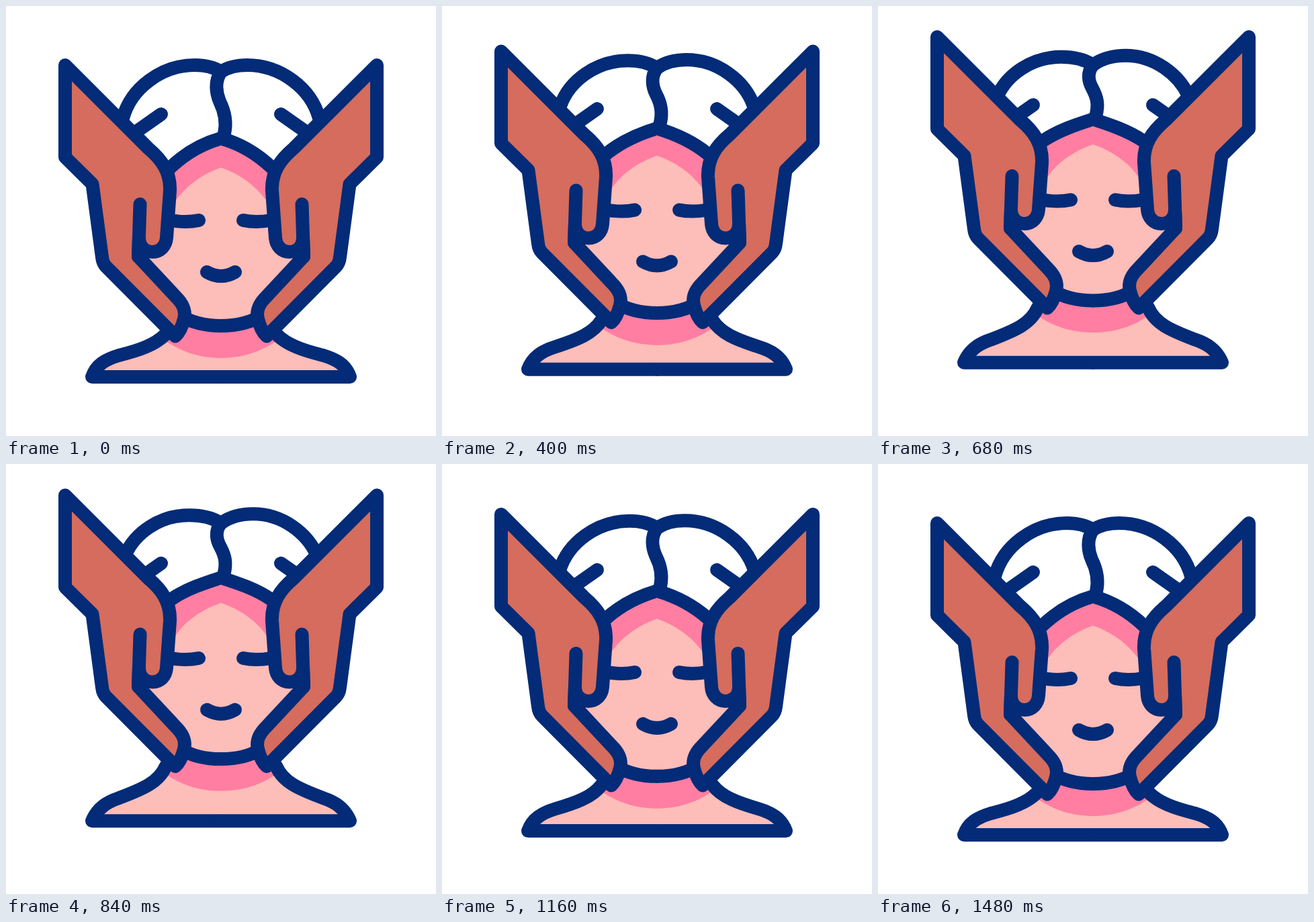
Recreate the animation shown at these times as an HTML page. Size 640 by 640 pixels, loop 1.52 s.

```html
<!DOCTYPE html>
<html lang="en">
<head>
<meta charset="utf-8">
<title>Face massage</title>
<style>
  html, body { margin: 0; width: 100%; height: 100%; overflow: hidden; background: #fff; }
  svg { display: block; width: 100vw; height: 100vh; }
  .line { fill: none; stroke: #032b77; stroke-width: 20; stroke-linecap: round; stroke-linejoin: round; }
  .skin { fill: #fdbdb8; }
  .pink { fill: #ff7ea2; }
  .line.hand { fill: #d56c5d; }
</style>
</head>
<body>
<svg viewBox="0 0 640 640">
  <defs>
    <g id="bodyHalf">
      <path class="skin" id="torso"/>
      <path class="pink" id="neck"/>
      <path class="line" id="shoulder"/>
    </g>
    <g id="faceHalf">
      <path class="skin" id="face"/>
      <path class="pink" id="band"/>
      <path class="line" id="hairline"/>
      <path class="line" id="chin"/>
      <path class="line" id="strand" d="M231 161L194 187"/>
      <path class="line" id="eye" d="M287 319Q268 323 246 319"/>
    </g>
    <g id="handHalf">
      <path class="line hand" d="M88 88V225L128.500 265L143 374Q144 383 149 388L252 491.500
        C258 486 262 478 265 466C268 454 264 444 253 433L197 373L198 345
        C198 357 206 366 218 366C230 366 238 357 239 345L244 275
        C245 247 232 229 212 212Z"/>
      <path class="line" d="M199.500 295L197 373"/>
    </g>
  </defs>
  <use href="#bodyHalf"/>
  <use href="#bodyHalf" transform="matrix(-1 0 0 1 640 0)"/>
  <use href="#faceHalf"/>
  <use href="#faceHalf" transform="matrix(-1 0 0 1 640 0)"/>
  <path class="line" id="hairLeft"/>
  <path class="line" id="hairRight"/>
  <path class="line" id="parting"/>
  <path class="line" id="mouth" d="M299 396Q320 408 341 396"/>
  <g id="hands">
    <use href="#handHalf"/>
    <use href="#handHalf" transform="matrix(-1 0 0 1 640 0)"/>
  </g>
</svg>
<script>
const LOOP = 1520, SWING = 750, STEP = 40, REACH = 1.025;
const $ = id => document.getElementById(id);

// Each path at rest and lifted; numbers are blended pairwise.
const morphs = {
  torso: [
    'M321 552L128 552C134 534 148 526 168 520C200 512 222 504 237 489L321 470Z',
    'M321 531L128 531C136 512 150 503 168 497C205 483 228 473 238 449L321 430Z'],
  neck: [
    'M321 476L258 462L237 498C264 517 292 524 321 524Z',
    'M321 438L258 424L237 461C264 480 292 486.5 321 486.5Z'],
  shoulder: [
    'M320 552L128 552C134 534 148 526 168 520C200 512 222 504 237 489',
    'M320 531L128 531C136 512 150 503 168 497C205 483 228 473 238 449'],
  face: [
    'M321 197L320 197C295 204 268 218 244 241L215 330L205 372L258 460C277 472 300 476 321 476Z',
    'M321 169L320 169C295 177 268 186 246 201L215 290L205 330L258 421C277 434 300 439 321 439Z'],
  band: [
    'M321 197L320 197C295 204 268 218 244 241L244 302C262 272 289 251 320 240.5L321 240.5Z',
    'M321 169L320 169C295 177 268 186 246 201L244 270C258 238 289 217 320 206.5L321 206.5Z'],
  hairline: [
    'M320 197C295 204 268 218 244 241',
    'M320 169C295 177 268 186 246 201'],
  hairLeft: [
    'M174 167C186 122 232 88 281 88C297 88 311 92 320 98',
    'M178 134C192 103 228 76 273 76C291 76 308 80 320 88'],
  hairRight: [
    'M466 167C454 122 408 88 359 88C343 88 329 92 320 98',
    'M462 134C448 103 412 74 368 74C350 74 332 79 320 88'],
  chin: [
    'M258 460C277 472 300 476 320 476',
    'M258 423C277 435 300 439 320 439'],
  parting: [
    'M320 98C310 112 313 130 318 142C325 156 329 172 325 190',
    'M320 88C310 100 314 114 319 123C326 136 329 147 324 165']
};

const shifts = { strand: -13.5, eye: -30, mouth: -30.3, hands: -41.5 };

// How far each part runs ahead of the hands, in ms.
const leads = {
  torso: 17, shoulder: 17, hairline: 14, band: 10, neck: 8, face: 8, chin: 8,
  eye: 8, mouth: 8, strand: 30, hairLeft: 25, hairRight: 25, parting: 25, hands: 2
};

function blend([low, high], k) {
  const num = /\d+(\.\d+)?/g, ends = high.match(num);
  let i = 0;
  return low.replace(num, n => (+n + (ends[i++] - n) * k).toFixed(2));
}

// Cubic Bezier easing with handles (0.616, 0) and (0.5, 1).
function ease(x) {
  let lo = 0, hi = 1;
  for (let i = 0; i < 24; i++) {
    const s = (lo + hi) / 2, r = 1 - s;
    if (1.848 * s * r * r + 1.5 * s * s * r + s * s * s < x) lo = s; else hi = s;
  }
  return lo * lo * (3 - 2 * lo);
}

function lift(id, t) {
  const away = Math.abs(t + leads[id] - SWING);
  return t ? REACH * ease(Math.max(0, 1 - away / SWING)) : 0;
}

function draw(now) {
  const t = Math.floor((now % LOOP) / STEP) * STEP;
  for (const id in morphs) $(id).setAttribute('d', blend(morphs[id], lift(id, t)));
  for (const id in shifts) {
    $(id).setAttribute('transform', `translate(0 ${(shifts[id] * lift(id, t)).toFixed(2)})`);
  }
}

function tick() {
  draw(performance.now());
  requestAnimationFrame(tick);
}
tick();
</script>
</body>
</html>
```
